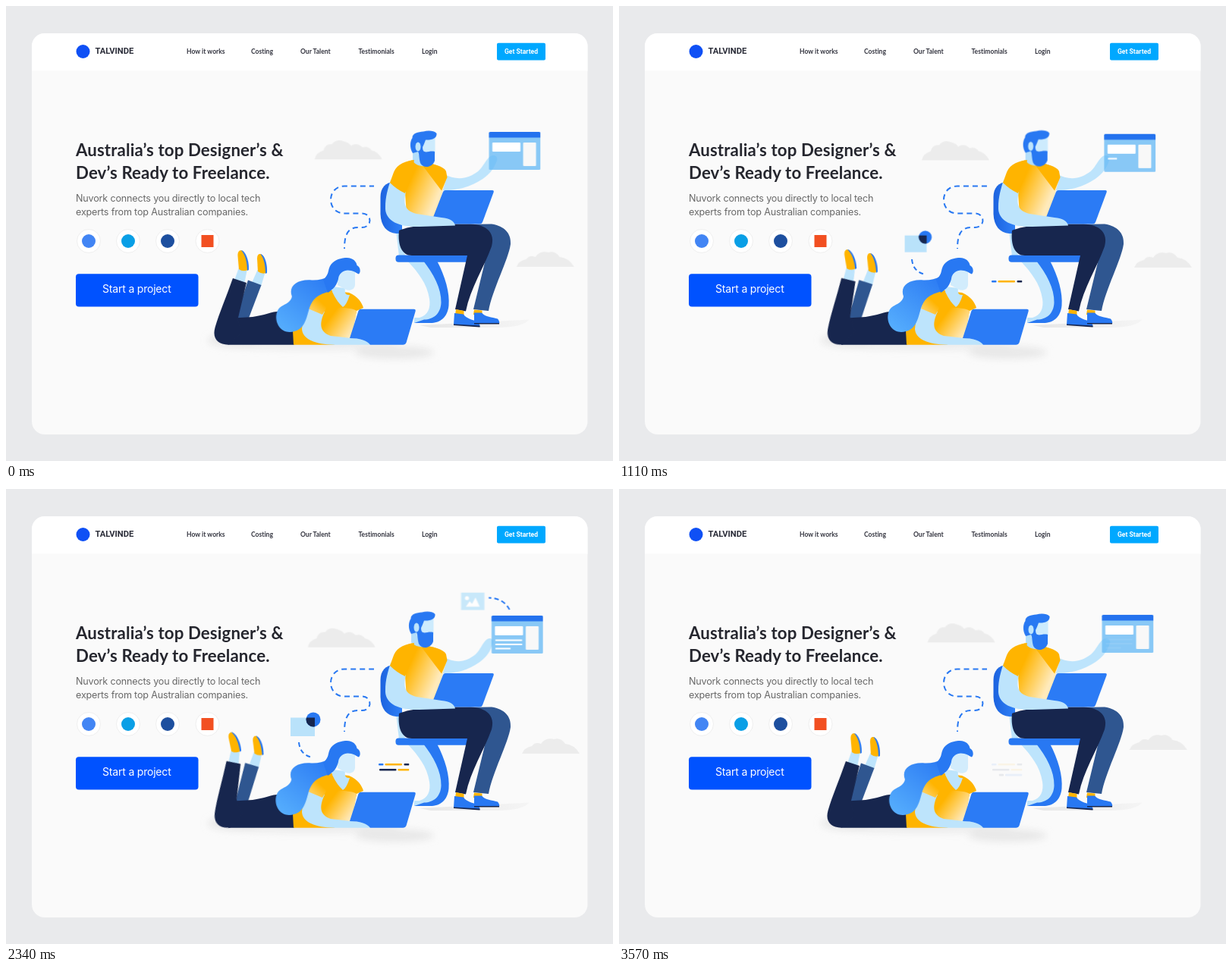
Recreate the animation shown at these times as an HTML page. Size 800 by 600 pixels, loop 3600 ms.

```html
<!DOCTYPE html>
<html lang="en">
<head>
<meta charset="utf-8">
<title>Landing page</title>
<style>
html, body { margin: 0; width: 100%; height: 100%; overflow: hidden; background: #e9eaec; }
svg { display: block; width: 800px; height: 600px; }
.lato { font-family: Lato, sans-serif; font-weight: 700; }
.nav { font-size: 8.5px; letter-spacing: .03px; fill: #33343f; }
.title { font-size: 22.2px; letter-spacing: .15px; fill: #25262e; }
.bold { font-family: Roboto, sans-serif; font-weight: 700; }
.copy { font-family: Inter, sans-serif; font-size: 12.6px; letter-spacing: -.18px; fill: #686868; }
.cta { font-family: Inter, sans-serif; font-size: 14px; letter-spacing: -.2px; fill: #fff; }
.skin { fill: #bde4fc; }
.navy { fill: #17264e; }
.steel { fill: #2f5690; }
.blue { fill: #2878f2; }
.amber { fill: #ffb400; }
.screen { fill: #2b7bf5; }
.dash { fill: none; stroke: #2878f2; stroke-width: 2; stroke-dasharray: 6 4; }
.wipe { fill: none; stroke: #fff; stroke-width: 8; }
[data-draw] { stroke-dasharray: 1 2; stroke-dashoffset: 1; }

.a, .b { animation: drift 1.8s cubic-bezier(.364, 0, .636, 1) infinite alternate; }
.a { animation-delay: -2.25s; }
.b { animation-delay: -1.35s; }
.leg { animation: kick 1.8s cubic-bezier(.364, 0, .636, 1) -3.5s infinite alternate; }
.reach { transform-origin: 578px 225px; animation: reach 1.8s cubic-bezier(.364, 0, .636, 1) -1.35s infinite alternate; }
.flow { --from: .8px; --to: 36.8px; animation: flow 3.6s linear infinite; }
.long { stroke-dasharray: 7 5; }
.short { --from: 8px; --to: 38px; }
.card { transform-origin: 391px 312px; animation: card 3.6s linear infinite; }
.tail { animation: tail 3.6s linear infinite; }
.photo { transform-origin: 612.5px 147px; animation: photo 3.6s linear infinite; }
.fade { animation: fade 3.6s linear infinite; }
.quick { animation: quick 3.6s linear infinite; }

@keyframes drift {
  from { transform: translate(var(--x, 0px), var(--y, 0px)); }
  to { transform: translate(calc(var(--x, 0px) * -1), calc(var(--y, 0px) * -1)); }
}
@keyframes kick { from { transform: rotate(0deg); } to { transform: rotate(var(--r)); } }
@keyframes reach { from { transform: scaleX(.95); } to { transform: scaleX(1.04); } }
@keyframes flow { from { stroke-dashoffset: var(--from); } to { stroke-dashoffset: var(--to); } }
@keyframes card {
  0%, 12.5% { opacity: 0; transform: scale(.5); }
  19.2% { opacity: 1; transform: scale(.74); animation-timing-function: ease-out; }
  45.8%, 79% { opacity: 1; transform: scale(1); }
  86.7% { opacity: .65; transform: scale(.69); }
  92.5%, 100% { opacity: 0; transform: scale(.5); }
}
@keyframes tail { 0%, 81% { opacity: 1; } 89%, 100% { opacity: 0; } }
@keyframes photo {
  0%, 61% { opacity: 0; transform: scale(.4); animation-timing-function: ease-out; }
  68% { opacity: 1; transform: scale(1.22); animation-timing-function: ease-in-out; }
  72.5%, 100% { opacity: 1; transform: scale(1); }
}
@keyframes fade { 0%, 90% { opacity: 1; } 100% { opacity: 0; } }
@keyframes quick { 0%, 89% { opacity: 1; } 98.5%, 100% { opacity: 0; } }
</style>
</head>
<body>
<svg viewBox="0 0 800 600" xmlns="http://www.w3.org/2000/svg">
<defs>
  <clipPath id="page"><rect x="34" y="36" width="732.5" height="529" rx="17"/></clipPath>
  <clipPath id="tile"><rect x="375" y="301.5" width="32" height="24.5"/></clipPath>
  <filter id="soft" x="-20%" y="-60%" width="140%" height="220%"><feGaussianBlur stdDeviation="5"/></filter>
  <linearGradient id="shirt" gradientUnits="userSpaceOnUse" x1="526" y1="240" x2="566" y2="258">
    <stop offset=".05" stop-color="#ffb400"/><stop offset="1" stop-color="#ffeabb"/>
  </linearGradient>
  <linearGradient id="blouse" gradientUnits="userSpaceOnUse" x1="424" y1="408" x2="459" y2="434">
    <stop offset=".1" stop-color="#ffb400"/><stop offset="1" stop-color="#fff0d2"/>
  </linearGradient>
  <linearGradient id="cuff" gradientUnits="userSpaceOnUse" x1="422" y1="382" x2="398" y2="408">
    <stop offset=".3" stop-color="#ffb400"/><stop offset="1" stop-color="#ffdc8c"/>
  </linearGradient>
  <linearGradient id="hair" gradientUnits="userSpaceOnUse" x1="440" y1="338" x2="368" y2="430">
    <stop offset=".2" stop-color="#2a79f3"/><stop offset="1" stop-color="#55adfd"/>
  </linearGradient>
  <linearGradient id="back" x1="0" y1="0" x2="1" y2="0">
    <stop offset="0" stop-color="#1c63df"/><stop offset="1" stop-color="#2f80f7"/>
  </linearGradient>
  <linearGradient id="floor" x1="0" y1="0" x2="1" y2="0">
    <stop offset="0" stop-color="#e6e6e6"/><stop offset="1" stop-color="#f5f5f5"/>
  </linearGradient>
  <mask id="m1" maskUnits="userSpaceOnUse" x="0" y="0" width="800" height="600"><path class="wipe" pathLength="1" data-draw="450 900" d="M531.5 363.3H490.5"/></mask>
  <mask id="m2" maskUnits="userSpaceOnUse" x="0" y="0" width="800" height="600"><path class="wipe" pathLength="1" data-draw="1660 2100" d="M531.5 370.2H491.5"/></mask>
  <mask id="m3" maskUnits="userSpaceOnUse" x="0" y="0" width="800" height="600"><path class="wipe" pathLength="1" data-draw="2460 2800" d="M531.5 377.1H500.5"/></mask>
  <mask id="m4" maskUnits="userSpaceOnUse" x="0" y="0" width="800" height="600"><path class="wipe" pathLength="1" data-draw="500 720" d="M404 354.5C394 352 387 346 386 333"/></mask>
  <mask id="m5" maskUnits="userSpaceOnUse" x="0" y="0" width="800" height="600"><path class="wipe" pathLength="1" data-draw="1900 2175" d="M662.5 162C659 150 649 143 633 142.5"/></mask>
</defs>

<rect width="800" height="600" fill="#e9eaec"/>
<g clip-path="url(#page)">
  <rect x="34" y="36" width="733" height="529" fill="#fafafa"/>
  <rect x="34" y="36" width="733" height="49.5" fill="#fff"/>
</g>

<circle cx="101.5" cy="60" r="9" fill="#0f50f5"/>
<text class="bold" x="117.5" y="63" font-size="11.2" fill="#2c2e3a">TALVINDE</text>
<g class="lato nav">
  <text x="238" y="63">How it works</text>
  <text x="323" y="63">Costing</text>
  <text x="388" y="63">Our Talent</text>
  <text x="464.5" y="63">Testimonials</text>
  <text x="548" y="63">Login</text>
</g>
<rect x="647" y="48.7" width="64" height="22.9" rx="2" fill="#00a8ff"/>
<text class="bold" x="679" y="62.6" font-size="8.6" fill="#fff" text-anchor="middle">Get Started</text>

<g class="lato title">
  <text x="92" y="198">Australia’s top Designer’s &amp;</text>
  <text x="92" y="227.5">Dev’s Ready to Freelance.</text>
</g>
<g class="copy">
  <text x="92" y="258">Nuvork connects you directly to local tech</text>
  <text x="92" y="275.5">experts from top Australian companies.</text>
</g>
<g fill="#fff" stroke="#efefef">
  <circle cx="109" cy="310" r="15.5"/><circle cx="161" cy="310" r="15.5"/>
  <circle cx="213" cy="310" r="15.5"/><circle cx="265.5" cy="310" r="15.5"/>
</g>
<circle cx="109" cy="310" r="9" fill="#4285f4"/>
<circle cx="161" cy="310" r="9" fill="#0a9fe6"/>
<circle cx="213" cy="310" r="9" fill="#1d4f9f"/>
<rect x="257.5" y="302" width="16" height="16" fill="#f25022"/>
<rect x="92" y="353.3" width="161.5" height="43.3" rx="4" fill="#0052ff"/>
<text class="cta" x="172.3" y="378" text-anchor="middle">Start a project</text>

<!-- clouds -->
<g fill="#ececec">
  <g transform="translate(-3 2.9)"><g class="a" style="--x:-4px"><g class="b" style="--y:3.8px">
    <path d="M404 202Q406 193 416 190Q418 181 427 182Q432 175 442 178Q450 180 452 184Q460 179 467 186Q475 184 479 190Q488 192 493 202Z"/>
  </g></g></g>
  <g transform="translate(2.3 2)"><g class="a" style="--x:3.3px"><g class="b" style="--y:3px">
    <path d="M675 344Q678 336 688 334Q692 328 700 331Q706 322 717 325Q726 322 732 331Q744 332 751 344Z"/>
  </g></g></g>
</g>

<path class="dash flow long" d="M485 237.5H446C422 237.5 422 273.5 446 273.5H469C483 273.5 483 292 469 292H464C451 292 446 301 446 320"/>

<!-- seated man -->
<path d="M545 421L690 413.5Q680 424 648 424H560Z" fill="url(#floor)"/>
<path class="skin" d="M514 296L521 290L526 330H518Z"/>
<path d="M512 232C500 232 493.5 240 493.5 252V274C494 290 502 299 514 300H522V232Z" fill="url(#back)"/>
<path class="blue" d="M549 336H568C579 357 585 378 583.5 395C582 411 572 418 559 418H538V412H550C563 411 572 404 571 390C570 370 561 352 549 336Z"/>
<path class="skin" d="M529 336H550C563 353 574 372 573.5 391C573 406 563 413.5 551 413.5L538 418V411H545C556 408 560 398 558 386C555 366 543 351 529 336Z"/>
<rect class="blue" x="513.5" y="328.5" width="98" height="9.3" rx="4"/>
<path class="steel" d="M605 288L640 287.5C657 290 666 300 665 314C662 335 641 374 636 402L616 400L632 334Z"/>
<path class="navy" d="M518 296C535 289 560 287.5 612 287.5C634 288 645 300 640 317C630 345 612 372 606 402.5L592 400L608 329H535C522 329 516 316 518 296Z"/>
<path class="amber" d="M593 400L603.5 402V408H592Z"/>
<path class="amber" d="M617 400.5L627.5 401.5V407H616Z"/>
<path class="blue" d="M591 405L603 406.5C607 413 615 413 622 417Q625 420 624.5 423L590 420Z"/>
<path class="blue" d="M617 404.5H627C632 410.5 640 410 648 412.5Q651 416 650 419H617Z"/>
<path class="navy" d="M590 419.5L624.5 421.5V423.5L590 421Z"/>
<path class="navy" d="M617 418H650V419.5H617Z"/>

<path class="skin reach" d="M576 221C594 231 608 228 621 218C628 212 630 203 637 198C642 195 647 199 645 204C642 213 637 221 627 228C611 239 594 243.5 570 243.5Z"/>
<path d="M537 203C524 206 514 213 514 226L526 246L528 276Q545 284 565 284L576 243L581 225C579 213 568 209 560 208Z" fill="url(#shirt)"/>
<path class="amber" d="M545 205C562 208 577 211 580 218L581.5 226L574 243.5Z"/>
<g transform="translate(-.8 -1.2)"><g class="b" style="--x:-1.2px;--y:-1.7px">
  <path d="M536 188L552 194L560 209Q546 215 536 205Z" fill="#b3defa"/>
  <path d="M543 173H565.5V195L556 201L543 196Z" fill="#cdebfd"/>
  <path class="blue" d="M536 194C531 186 533 177 535.5 174C535 168 543 166 550 165.500C556 164 564 164 567.5 168C568 174 562 177 553 176.5Q551 182 549 186C549 197 557 190 565 192V204C562 213 550 215 546 207C544 200 545 196 543 192Z"/>
  <ellipse cx="543" cy="185.5" rx="3.5" ry="6" fill="#bde4fc"/>
</g></g>
<path class="screen" d="M576 245Q577 243 579 243H641Q643.5 243 642.5 246L628 285Q627 287.5 624 287.5H582L562 281Z"/>
<path class="skin" d="M507 229L527 245C523 262 526 270 541 274L574 279C585 280 591 284 592 289.500L545 291C514 292 499 281 500 265C500 252 503 242 507 229Z"/>
<path class="amber" d="M538 203C521 205 513 212 510 222L506 233Q515 242 526 247L534 226Z"/>

<!-- browser window -->
<g transform="translate(1.4 1.2)"><g class="b" style="--x:1.5px"><g class="a" style="--y:1.7px">
  <rect x="637.3" y="166" width="67.7" height="50" rx="1.5" fill="#64b9f5" fill-opacity=".76"/>
  <path d="M637.3 173.5V167.5Q637.3 166 639 166H703.3Q705 166 705 167.5V173.5Z" fill="#2472ee"/>
  <rect x="641.7" y="180" width="37" height="12" rx="1" fill="#fff"/>
  <rect x="682.3" y="180" width="17" height="31" rx="1" fill="#f8f8f8"/>
  <g class="fade" fill="none" stroke="#fff" stroke-width="2">
    <path pathLength="1" data-draw="1010 1310" d="M642.3 198.5H677.5"/>
    <path pathLength="1" data-draw="1310 1610" d="M642.3 204H677.5"/>
    <path pathLength="1" data-draw="1610 1800" d="M642.3 209.5H662.3"/>
  </g>
  <g class="quick">
    <g mask="url(#m5)"><path class="dash flow short" d="M662 160.5C657 149 648 143 633.5 142.5"/></g>
    <g class="photo">
      <rect x="597.5" y="136" width="30" height="22.3" fill="#b9e2fa"/>
      <circle cx="605" cy="143" r="2.6" fill="#fff"/>
      <path d="M603.5 154L608.5 147L611.5 150.5L616 142L621.5 154Z" fill="#fff"/>
    </g>
  </g>
</g></g></g>

<!-- notes between the two -->
<g class="card">
  <rect x="375" y="301.5" width="32" height="24.5" fill="#b9e2fa"/>
  <circle class="blue" cx="405" cy="304" r="9.5"/>
  <circle class="navy" cx="405" cy="304" r="9.5" clip-path="url(#tile)"/>
</g>
<g class="tail"><path class="dash" mask="url(#m4)" d="M386 334C387 346 394 352 404 354"/></g>
<g class="fade">
  <g mask="url(#m1)">
    <rect class="blue" x="491" y="362" width="6.5" height="2.6" rx="1"/>
    <rect class="amber" x="499.5" y="362" width="22.5" height="2.6" rx="1"/>
    <rect class="navy" x="524.5" y="362" width="7" height="2.6" rx="1"/>
  </g>
  <g mask="url(#m2)">
    <rect class="navy" x="492" y="368.9" width="22.5" height="2.6" rx="1"/>
    <rect class="amber" x="516.5" y="368.9" width="15" height="2.6" rx="1"/>
  </g>
  <g mask="url(#m3)">
    <rect class="navy" x="500.5" y="375.8" width="6.5" height="2.6" rx="1"/>
    <rect class="blue" x="509" y="375.8" width="22.5" height="2.6" rx="1"/>
  </g>
</g>

<!-- lying woman -->
<g filter="url(#soft)" fill="#e2e2e2">
  <ellipse cx="300" cy="441" rx="34" ry="9" opacity=".7"/>
  <ellipse cx="405" cy="447" rx="115" ry="6" opacity=".6"/>
  <ellipse cx="512" cy="457" rx="52" ry="8" opacity=".75"/>
</g>
<g class="leg" style="--r:-4.3deg;transform-origin:312px 420px">
  <path class="skin" d="M331.5 348L342 350L336 370L324 365Z"/>
  <path class="amber" d="M331 333C331 325 338 325 341 334C343 341 344 347 343 352Q337 354 332 350Z"/>
  <path class="blue" d="M335.5 327C341 328 345 341 344 352L342 353C342 342 340 333 335.5 327Z"/>
  <path class="steel" d="M319 361.5L336.5 368L319 414L300 420Z"/>
</g>
<path class="navy" d="M292 412L325 410C340 408 350 403 361 402.5L384 420L380 446.7H293Z"/>
<g class="leg" style="--r:-8.2deg;transform-origin:293px 427px">
  <path class="skin" d="M307 345L318 347L314 367L301 362Z"/>
  <path class="amber" d="M305.5 329C305.5 320 313 320 316 330C318.5 338 320 344 319 348Q312 351 307 347Z"/>
  <path class="blue" d="M310 322C316 323 321 337 320 348L318 349C318 338 315.5 328 310 322Z"/>
  <path class="navy" d="M299 359L317 365L306 411L311 432L293 446.7C279 446.7 271.5 438 275.5 424C281 405 291 382 299 359Z"/>
</g>
<path class="amber" d="M378 428L394 404L404 383C412 375 424 373 435 376L452 378C464 383 469 391 471 398L462 402L455 438L432 446.7H379Z"/>
<path d="M420 392C430 400 455 396 462 402L455 440L424 440C412 430 414 408 420 392Z" fill="url(#blouse)"/>
<path class="skin" d="M399 394L420 403C412 420 414 430 428 435L455 438C468 438 478 442 480 446.7H432C408 446 391 440 390 426C391 414 395 404 399 394Z"/>
<path d="M403 384C408 376 418 375 427 379L424 394Q421 402 417 407L398 399Q400 392 403 384Z" fill="url(#cuff)"/>
<path class="skin" d="M430 370L447 372C446 380 448 381 453 381Q449 394 444 397Q436 390 430 377Z"/>
<path d="M436 352C440 344 452 344 460 349V368C459 375 452 376 447 373.5L437 368Z" fill="#d2ecfc"/>
<g class="a" style="--x:-1.1px">
  <path d="M436 343C430 355 420 362 402 361.5C382 360 371 370 376 383C374 394 361 393 357 402C352 413 358 430 373 430C391 429 394 416 398 402C402 388 408 381 424 377Q433 370 436 358Z" fill="url(#hair)"/>
</g>
<path class="blue" d="M447 332C457 331 462 337 462.5 342C467 344 468 351 465 353.5C461 352 460 350 455 349C446 347 441 351 438.5 357C437 368 431 374 424 378L418 361C426 354 424 349 427 343C431 336 438 333 447 332Z"/>
<path class="screen" d="M464.5 402Q465.5 399.7 468 399.7H537.5Q540.5 399.7 539.5 403L527.5 444Q526.5 446.7 523.5 446.7H480C476 441 466 438 453 438Z"/>
</svg>
<script>
// Each stroke is drawn between its own start and end time within the loop.
const LOOP = 3600;
for (const el of document.querySelectorAll('[data-draw]')) {
  const [start, end] = el.dataset.draw.split(' ').map(ms => ms / LOOP);
  el.animate([
    { strokeDashoffset: 1, offset: 0 },
    { strokeDashoffset: 1, offset: start },
    { strokeDashoffset: 0, offset: end },
    { strokeDashoffset: 0, offset: 1 }
  ], { duration: LOOP, iterations: Infinity });
}
</script>
</body>
</html>
```
